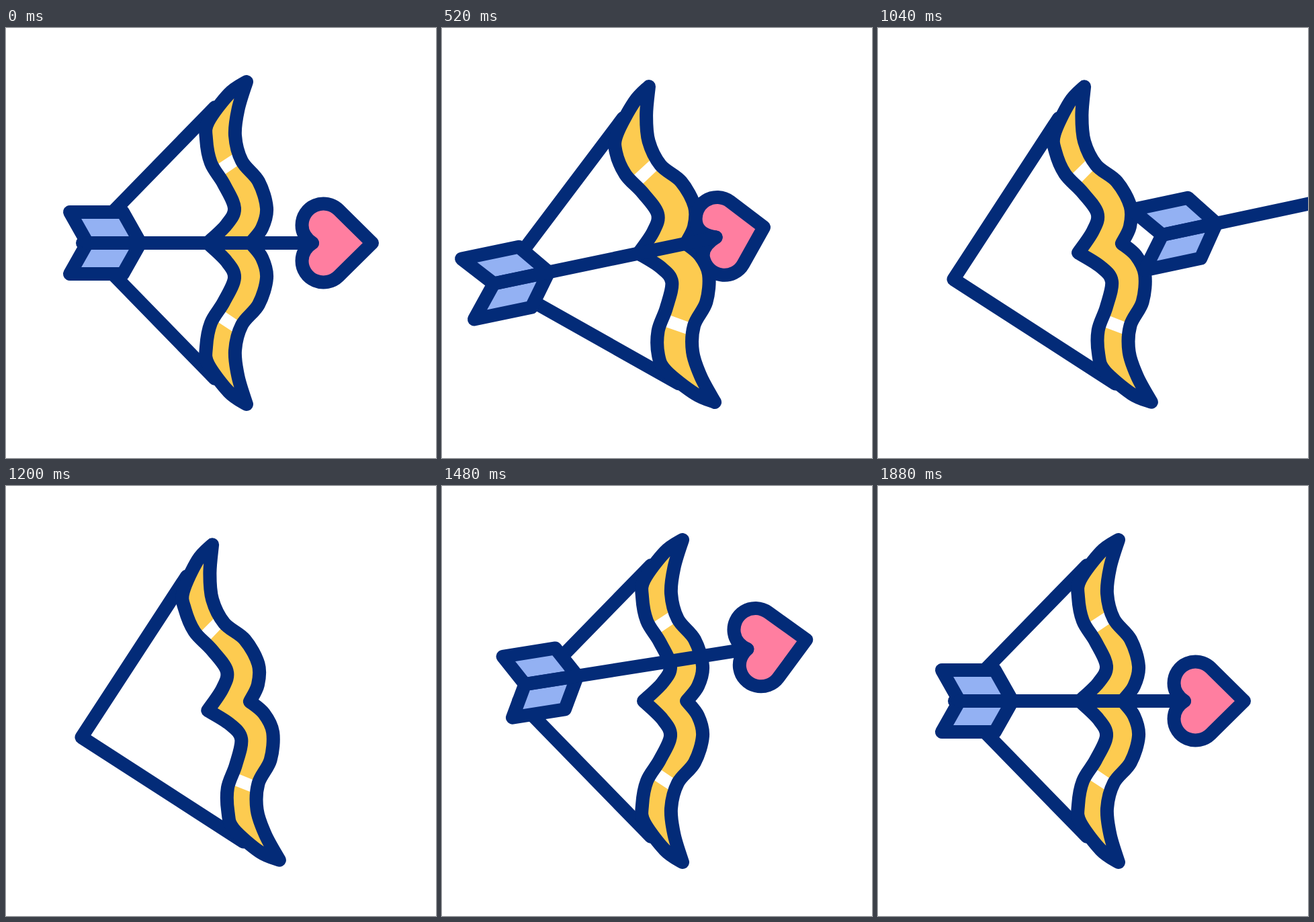
Animation of 640 by 640 pixels, one loop 2 s. Source, as an HTML page:

```html
<!DOCTYPE html>
<html lang="en">
<head>
<meta charset="utf-8">
<title>Bow and arrow</title>
<style>
  html, body { margin: 0; width: 100%; height: 100%; overflow: hidden; background: #fff; }
  svg { display: block; width: 100vw; height: 100vh; }
  .line { stroke: #032b78; stroke-width: 20; stroke-linecap: round; stroke-linejoin: round; fill: none; }
</style>
</head>
<body>
<svg viewBox="0 0 640 640">
  <g id="bow">
    <path id="limbFill" fill="#fdcb50"/>
    <path id="bands" fill="#fff"/>
    <path id="string" class="line"/>
    <path id="limb" class="line"/>
  </g>
  <g id="arrow">
    <path id="feathers" class="line" style="fill:#93b1f3"/>
    <path id="heart" class="line" style="fill:#ff7ea0"/>
    <path id="shaft" class="line"/>
  </g>
</svg>
<script>
const LOOP = 2000, STEP = 40, MID = 320;
const el = {};
document.querySelectorAll('[id]').forEach(e => { el[e.id] = e; });
const path = (name, d) => el[name].setAttribute('d', d);

const clamp = u => Math.min(1, Math.max(0, u));
const flip = pts => pts.map(([x, y]) => [x, 2 * MID - y]);
const poly = pts => 'M' + pts.join('L');

// Smooth curve through the points, as cubic segments.
function spline(pts) {
  let d = '';
  for (let i = 1; i < pts.length; i++) {
    const [a, b] = [pts[i - 1], pts[i]];
    const before = pts[i - 2] || a, after = pts[i + 1] || b;
    const c1 = a.map((v, k) => v + (b[k] - before[k]) / 6);
    const c2 = b.map((v, k) => v - (after[k] - a[k]) / 6);
    d += `C${c1} ${c2} ${b}`;
  }
  return d;
}

// Upper half of the bow, from tip to grip; the lower half mirrors it.
const back = [[358, 80], [345.5, 121], [341, 160], [351, 198], [376, 228.5], [388, 268], [381, 298], [364, MID]];
const front = [[358, 80], [332, 98], [301, 139.5], [298, 165], [305, 201], [324, 232], [340, 268], [328, 293], [300, MID]];

function drawBow(bend, nock) {
  const swell = 9 * bend;
  const belly = front.map(([x, y]) => [x - swell * clamp((y - 115) / 50), y]);
  const d = 'M' + back[0] + spline(back) + spline(flip(back).reverse()) +
    spline(flip(belly)) + spline(belly.slice().reverse()) + 'Z';
  path('limbFill', d);
  path('limb', d);

  const band = [[306 - swell, 208.5 + swell / 3], [342, 185], [352, 200], [316 - swell, 224.5 + swell / 3]];
  path('bands', poly(band) + 'Z' + poly(flip(band)) + 'Z');
  path('string', poly([[311, 118], [nock, MID], [311, 522]]));
}

// A positive drag trails the feathers and pushes the shaft into the heart.
function drawArrow(drag) {
  const notch = 121 + 15 * drag, neck = 200 + 20 * drag, cleft = 456 + 18 * drag;
  const feather = [[95, 274], [174 + 9 * drag, 274], [neck, MID], [notch, MID]];
  path('feathers', poly(feather) + 'Z' + poly(flip(feather)) + 'Z');
  path('shaft', `M${notch},${MID}H${cleft}`);

  const tip = 545, r = 32, drop = 26.5, lobeX = 472.5 + 8 * drag;
  const angle = Math.atan2(drop, tip - lobeX) - Math.acos(r / Math.hypot(drop, tip - lobeX));
  const x = lobeX + r * Math.cos(angle), up = drop - r * Math.sin(angle);
  const left = lobeX - r, inX = 447 + 10 * drag;
  path('heart',
    `M${tip},${MID}L${x},${MID - up}A${r},${r} 0 0 0 ${left},${MID - drop}` +
    `C${left},${MID - 15} ${inX},${MID - 6} ${cleft},${MID}` +
    `C${inX},${MID + 6} ${left},${MID + 15} ${left},${MID + drop}` +
    `A${r},${r} 0 0 0 ${x},${MID + up}Z`);
}

const place = (x, y, tilt, originX) =>
  `translate(${x} ${y}) rotate(${-tilt}) translate(${-originX} ${-MID})`;

function draw(t) {
  const part = (from, to) => clamp((t - from) / (to - from));
  const ease = (from, to) => (1 - Math.cos(Math.PI * part(from, to))) / 2;

  const pull = ease(80, 640), back = ease(1220, 1440);
  const nock = 114 - 38 * pull + 32 * ease(880, 1040) + 6 * ease(1320, 1440);
  drawBow(pull - ease(880, 1120), nock);

  const dip = 22 * ease(80, 280) - 20 * ease(280, 500) - 2 * back;
  const tilt = 12 * (ease(80, 560) - back);
  const pose = place(358 - ease(80, 560) + back, MID + dip, tilt, 358);
  el.bow.setAttribute('transform', pose);

  if (t <= 1200) {
    drawArrow(pull - 0.6 * ease(880, 1200));
    el.arrow.setAttribute('transform', `${pose} translate(${728 * ease(880, 1200) - 70 * pull} 0)`);
  } else {
    // A fresh arrow rises from below and settles on the string.
    const rise = 1 - (1 - part(1240, 1480)) ** 2;
    drawArrow(-0.3 * (1 - ease(1320, 1480)));
    el.arrow.setAttribute('transform',
      place(365 - 45 * rise, 783 - 519 * rise + 56 * ease(1480, 1880), 12 * (1 - ease(1280, 1880)), MID));
  }
}

const start = performance.now();
function tick() {
  const t = Math.max(0, performance.now() - start) % LOOP;
  draw(Math.floor(t / STEP) * STEP);
  requestAnimationFrame(tick);
}
tick();
</script>
</body>
</html>
```
